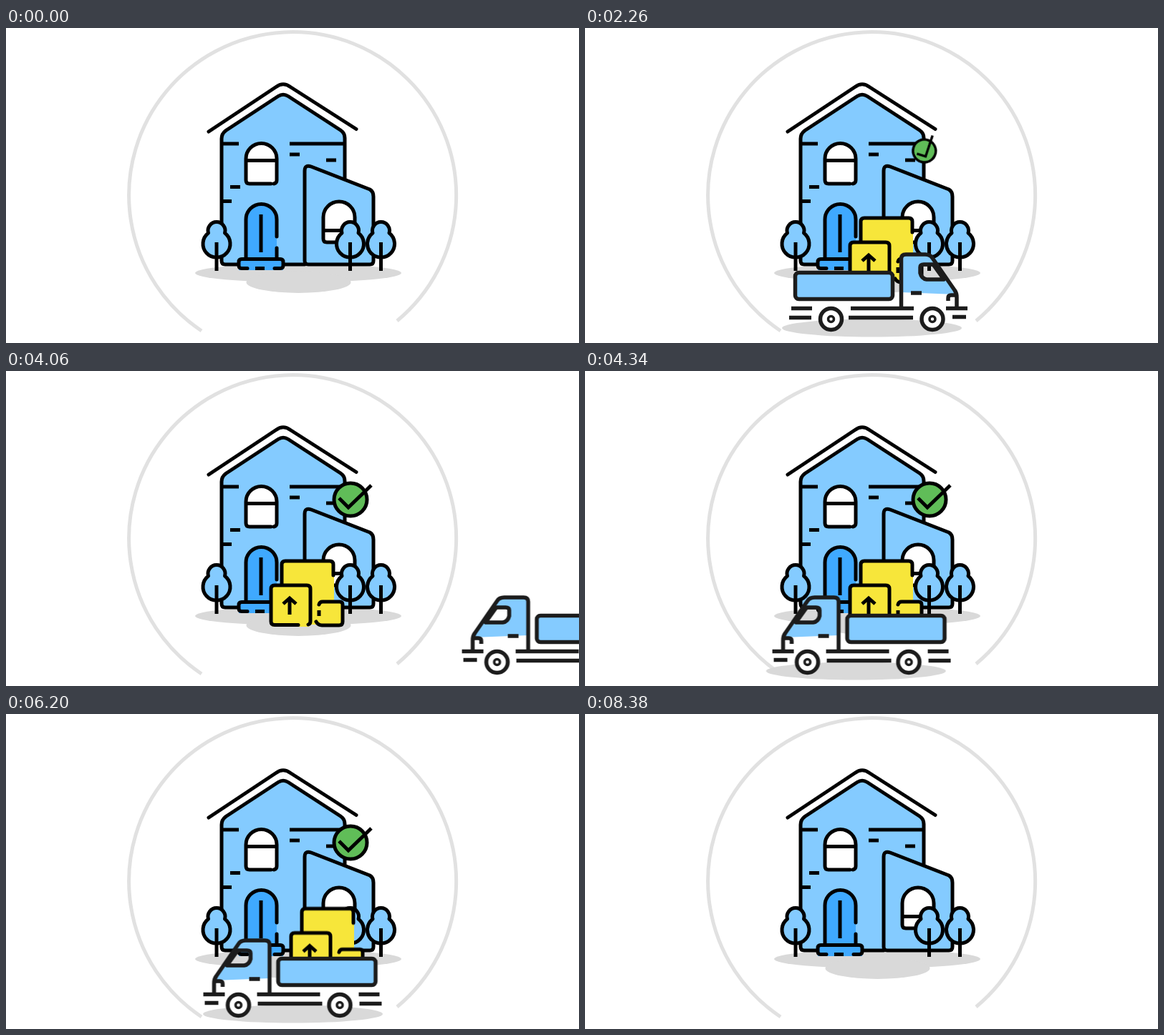
An HTML page that plays this animation: 800x441 px, repeating every 8400 ms.

```html
<!DOCTYPE html>
<html lang="en">
<head>
<meta charset="utf-8">
<title>Moving house</title>
<style>
html, body { margin: 0; width: 100%; height: 100%; overflow: hidden; background: #fff; }
svg { display: block; width: 800px; height: 441px; }
.ink { stroke: #000; stroke-width: 5; fill: none; }
.round { stroke-linecap: round; stroke-linejoin: round; }
.sky { fill: #84cbff; }
.door { fill: #3fa9ff; }
.white { fill: #fff; }
.yellow { fill: #f7e63a; }
.green { fill: #60bd58; }
.grey { fill: #d9d9d9; }
.truck { stroke: #1c1c1c; stroke-width: 5.5; fill: none; }

.out, .back, .load, .check {
  animation: 8400ms cubic-bezier(.37, 0, .63, 1) infinite;
}
.out { --k: 1; animation-name: out; }
.back { --k: 1; animation-name: back; }
.far { --k: 1.6; }
.load { animation-name: load; }
.check { animation-name: check; transform-origin: 460px 177px; }

@keyframes out {
  0%, 4.29% { transform: translateX(calc(var(--k) * -560px)); }
  10.24% { transform: translateX(calc(var(--k) * 15px)); }
  13.81%, 29.76% { transform: translateX(0px); }
  33.33% { transform: translateX(calc(var(--k) * -15px)); }
  39.29%, 100% { transform: translateX(calc(var(--k) * 560px)); }
}
@keyframes back {
  0%, 45.96% { transform: translateX(calc(var(--k) * 560px)); }
  51.91% { transform: translateX(calc(var(--k) * -16px)); }
  55.48%, 82.14% { transform: translateX(0px); }
  85.12% { transform: translateX(calc(var(--k) * 15px)); }
  91.07%, 100% { transform: translateX(calc(var(--k) * -560px)); }
}
@keyframes load {
  0%, 4.29% { transform: translate(-613px, 6.5px); }
  10.24% { transform: translate(-38px, 6.5px); }
  13.81%, 14.29% { transform: translate(-53px, 6.5px); }
  22.62%, 63.1% { transform: translate(0px, 0px); }
  71.43%, 82.14% { transform: translate(28px, 6.5px); }
  85.12% { transform: translate(43px, 6.5px); }
  91.07%, 100% { transform: translate(-532px, 6.5px); }
}
@keyframes check {
  0%, 24.17% { transform: rotate(-90deg) scale(0); }
  28.57%, 75% { transform: rotate(0deg) scale(1); }
  79.17%, 100% { transform: rotate(-90deg) scale(0); }
}
</style>
</head>
<body>
<svg viewBox="0 0 800 441">
  <defs>
    <g id="tree">
      <path class="ink sky round" d="M-11.5 287A12 12 0 1 1 11.5 287A19 19 0 1 1 -11.5 287Z"/>
      <path class="ink" d="M0 300V340"/>
    </g>
    <g id="wheel">
      <circle class="white" r="15" stroke="#1c1c1c" stroke-width="5.5"/>
      <circle class="white" r="4" stroke="#1c1c1c" stroke-width="3.5"/>
    </g>
    <g id="truck">
      <path class="white" d="M441.5 368H515L519 378V392H441.5Z"/>
      <!-- the window is a hole in the cab -->
      <path class="sky" fill-rule="evenodd" d="M441.5 370V317H480L517 369L518 373Z
        M468 335Q468 331 473 331H486L501 352H477Q470 351 468 343Z"/>
      <g class="truck round">
        <path d="M441.5 391V323Q441.5 317 448 317H475Q482 317 485 322L516 367Q519 371 519 377V390"/>
        <path d="M468 335Q468 331 473 331H486L501 352H477Q470 351 468 343Z"/>
        <rect class="sky" x="293.5" y="342.5" width="136" height="37" rx="5"/>
      </g>
      <path class="truck" d="M455 371H470M507 382V378Q507 374 511 374H518
        M288 392.5H317M371 392.5H459M504 392.5H534M285 405.5H316M368 405.5H458M513 404.5H532"/>
      <use href="#wheel" x="343.5" y="407.5"/>
      <use href="#wheel" x="485" y="407.5"/>
    </g>
    <ellipse id="shadow" class="grey" cx="400.5" cy="420" rx="125.5" ry="12.5"/>
  </defs>

  <path d="M273 424A228.5 228.5 0 1 1 546 410" fill="none" stroke="#e1e1e1" stroke-width="5"/>
  <ellipse class="grey" cx="408" cy="343" rx="144" ry="13"/>
  <ellipse class="grey" cx="408.5" cy="356" rx="73" ry="15"/>

  <g class="ink round">
    <path d="M283 145L377 82.5Q387 75 397 82.5L489 141.5"/>
    <path class="sky" stroke="none" d="M301 331V155L307 145L387 93L473 147V331Z"/>
    <path d="M473 212V154Q473 147 467 143L394 95.5Q387 91 380 95.5L307 143.5Q301 148 301 155V326Q301 331 306 331H417"/>
    <path class="sky" d="M422 331Q417 331 417 326V200Q417 191 426 194L508 226Q513 229 513 236V326Q513 331 508 331Z"/>
    <path class="white" stroke="none" d="M335 218V183a21.5 21.5 0 0 1 43 0V218Z"/>
    <path d="M370 218H340q-5 0 -5 -5V183a21.5 21.5 0 0 1 43 0V213q0 4 -4 5M335 185.5H378"/>
    <path class="white" stroke="none" d="M443 301V265a22 22 0 0 1 44 0V301Z"/>
    <path d="M464 300H448q-5 0 -5 -5V265a22 22 0 0 1 44 0V295M443 283.5H487"/>
    <path class="door" stroke="none" d="M335 324V268a21.5 21.5 0 0 1 43 0V324Z"/>
    <path d="M335 323V268a21.5 21.5 0 0 1 43 0V292M378 308V323"/>
  </g>
  <path class="ink" d="M302 162H325M396 162H473M396 177H410M447 185H461M313 222.5H327M303 242.5H315M356 261V314"/>
  <rect class="door" x="325" y="323" width="62" height="16"/>
  <path class="ink round" d="M337 336.5H329q-4 0 -4 -4V327.5q0 -4 4 -4H383q4 0 4 4V332.5q0 4 -4 4H375"/>
  <path class="ink" d="M348 336.5H361"/>

  <use href="#tree" x="294"/>
  <use href="#tree" x="480.5"/>
  <use href="#tree" x="523.5"/>

  <g class="check">
    <circle class="ink green" style="fill:#60bd58" cx="481" cy="180" r="23"/>
    <path class="ink" d="M465 178L478 191L510 160"/>
  </g>

  <g class="load">
    <rect class="yellow" x="385" y="266" width="73" height="89"/>
    <path class="ink round" d="M385 300V271q0 -5 5 -5H452q5 0 5 5V286"/>
    <rect class="yellow" x="437" y="323" width="33" height="33"/>
    <path class="ink round" d="M437 327q1 -4 5 -4H466q4 0 4 4V351q0 5 -5 5H441q-5 0 -8 -5"/>
    <path class="ink" d="M437 335V343"/>
    <rect class="yellow" x="370" y="300" width="55" height="58" rx="4"/>
    <path class="ink round" d="M408 355.5H375q-5 0 -5 -5V305q0 -5 5 -5H420q5 0 5 5V350q0 4 -3 5"/>
    <path class="ink" d="M396 341V319M387 326L396 318L405 326"/>
  </g>

  <use class="out far" href="#shadow"/>
  <g class="out"><use href="#truck"/></g>
  <use class="back far" href="#shadow"/>
  <g class="back"><use href="#truck" transform="matrix(-1 0 0 1 809.5 0)"/></g>
</svg>
</body>
</html>
```
